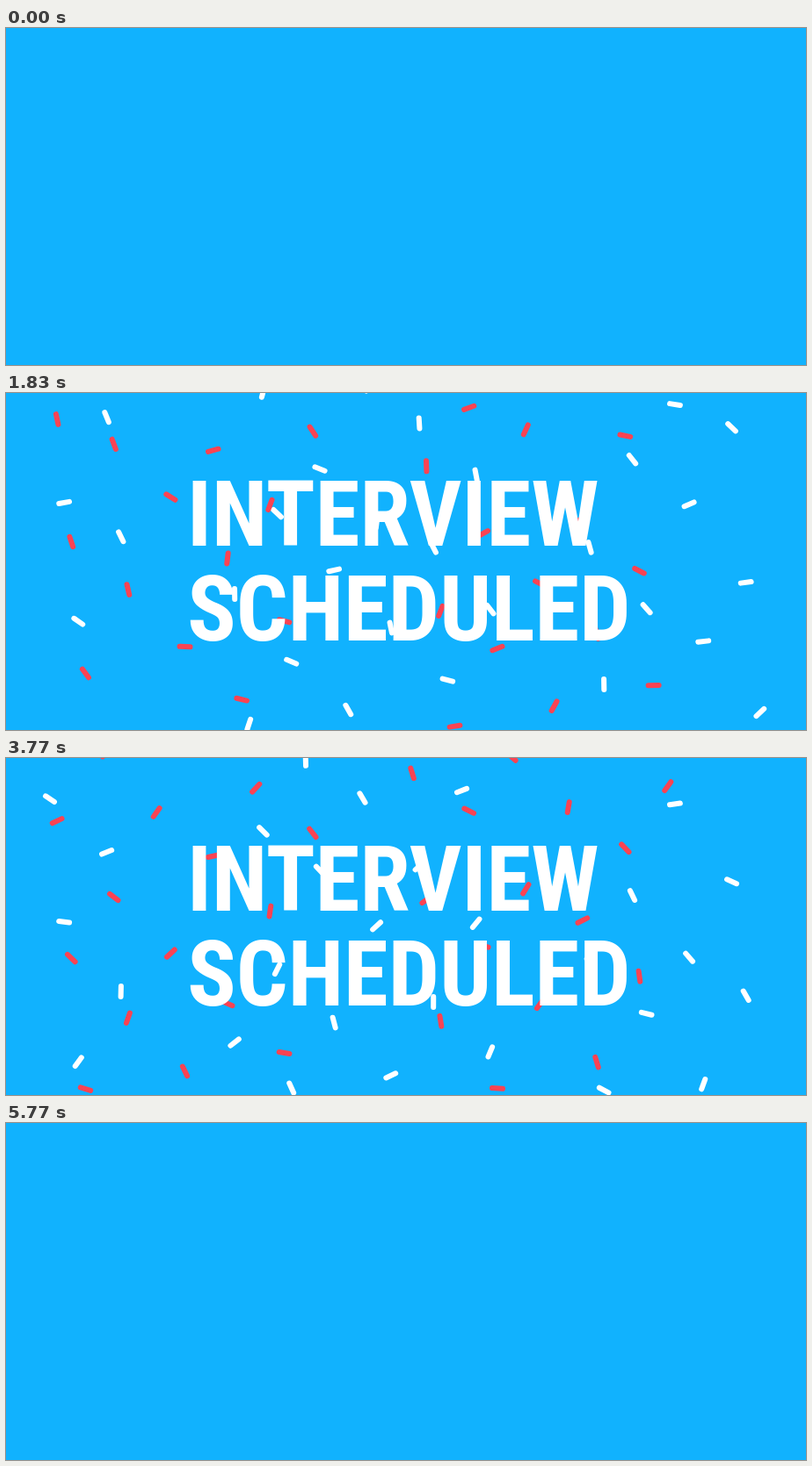
These frames come from a looping animation (910 px wide and 384 px high, 6010 ms). An HTML page with a canvas:

```html
<!DOCTYPE html>
<html lang="en">
<head>
<meta charset="utf-8">
<title>Interview scheduled</title>
<style>
html, body { margin: 0; width: 100%; height: 100%; overflow: hidden; background: #11b2fe; }
canvas { display: block; width: 910px; height: 384px; }
</style>
</head>
<body>
<canvas id="stage" width="910" height="384"></canvas>
<script>
const ctx = document.getElementById('stage').getContext('2d');
const W = 910, H = 384, LOOP = 6.01, END = 5.765, MID = 3.07;
const BLUE = '#11b2fe', RED = '#fa4353', WHITE = '#fff';
const COUNT = 76;

const clamp = u => Math.max(0, Math.min(1, u));
const lerp = (a, b, u) => a + (b - a) * u;
const easeOut = (u, power) => 1 - Math.pow(1 - clamp(u), power);
const easeIn = (u, power) => Math.pow(clamp(u), power);

let seed = 7;
const random = (a, b) => {
  seed = seed * 16807 % 2147483647;
  return lerp(a, b, seed / 2147483647);
};

// An additive sequence spreads the pieces evenly without a visible grid.
// x, y and angle hold half way through the fall.
const confetti = Array.from({ length: COUNT }, (_, i) => ({
  x: lerp(42, 866, (i + 1) * 0.7549 % 1),
  y: lerp(-95, 440, (i + 1) * 0.5698 % 1),
  angle: random(0, Math.PI),
  spin: random(-6.4, 6.4),
  speed: random(13, 37),
  color: i % 2 ? RED : WHITE,
  enter: random(0, 0.55),
  leave: random(5.04, 5.16)
}));

const fall = t => 0.48 * t + 0.1825 * t * t;
const turn = t => (1 - Math.cos(Math.PI * clamp(t / 5.5))) / 2;

// Pieces shoot in from the nearer side and shoot out the same way.
function drawPiece(p, t) {
  const away = 1 - easeOut((t - p.enter) / 0.7, 4) + easeIn((t - p.leave) / 0.65, 4);
  const x = p.x + Math.sign(p.x - W / 2) * 560 * away;
  const y = p.y + p.speed * (fall(t) - fall(MID));
  const a = p.angle + p.spin * (turn(t) - turn(MID));
  const dx = 6 * Math.cos(a), dy = 6 * Math.sin(a);
  ctx.strokeStyle = p.color;
  ctx.beginPath();
  ctx.moveTo(x - dx, y - dy);
  ctx.lineTo(x + dx, y + dy);
  ctx.stroke();
}

// A line slides down into its mask, then on down out of it.
function drawLine(text, baseline, enter, leave, t) {
  const shift = easeOut((t - enter) / 0.62, 3) - 1 + easeIn((t - leave) / 0.6, 3);
  ctx.save();
  ctx.beginPath();
  ctx.rect(0, baseline - 75, W, 76.5);
  ctx.clip();
  ctx.fillStyle = WHITE;
  ctx.fillText(text, 206, baseline + 80 * shift);
  ctx.restore();
}

function draw(t) {
  ctx.fillStyle = BLUE;
  ctx.fillRect(0, 0, W, H);
  if (t < 0.03 || t >= END) return;
  ctx.lineWidth = 6;
  ctx.lineCap = 'round';
  confetti.forEach(p => drawPiece(p, t));
  ctx.font = 'condensed bold 103.3px "Roboto Condensed", Roboto, sans-serif';
  drawLine('INTERVIEW', 174, 0.4, 5.1, t);
  drawLine('SCHEDULED', 281.7, 0.7, 5.17, t);
}

const start = performance.now();
function tick() {
  draw((performance.now() - start) / 1000 % LOOP);
  requestAnimationFrame(tick);
}
tick();
</script>
</body>
</html>
```
